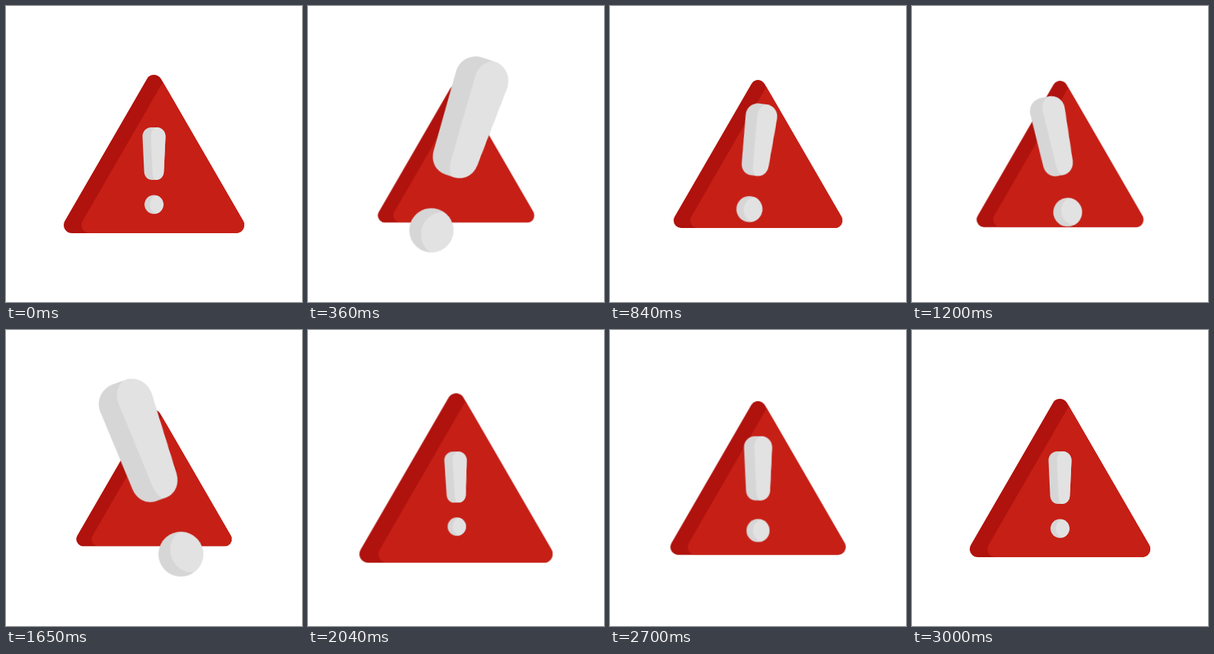
These frames come from a looping animation (400 by 400 pixels, 5.03 s). An HTML page:

```html
<!DOCTYPE html>
<html lang="en">
<head>
<meta charset="utf-8">
<title>Warning sign</title>
<style>
  html, body { margin: 0; width: 100%; height: 100%; overflow: hidden; background: #fff; }
  svg { display: block; width: 100%; height: 100%; }

  .sign, .mark, .tilt {
    animation: 5030ms cubic-bezier(.5, 0, .5, 1) infinite;
  }
  .sign { transform-origin: 200px 200px; animation-name: sign; }
  .mark { transform-origin: 200px 222.5px; animation-name: mark; }
  .tilt { transform-origin: 200px 222.5px; animation-name: tilt; }

  @keyframes sign {
    0%, 59.64%, 100% { transform: scale(1); }
    8.35%  { transform: scale(.862); }
    19.38% { transform: scale(.943); }
    32.21% { transform: scale(.86); }
    44.73% { transform: scale(1.123); }
    50.7%  { transform: scale(.963); }
  }
  @keyframes mark {
    0%, 59.64%, 100% { transform: translate(0, 0) scale(1); }
    8.35%  { transform: translate(.5px, -21.4px) scale(2.375); }
    19.38% { transform: translate(-4px, -9.2px) scale(1.265); }
    32.21% { transform: translate(-.7px, -21.6px) scale(2.375); }
    44.73% { transform: translate(.5px, 3.8px) scale(.62); }
    50.7%  { transform: translate(0, -9.4px) scale(1.28); }
  }
  @keyframes tilt {
    0%, 50.7%, 100% { transform: rotate(0deg); }
    8.35%  { transform: rotate(19deg); animation-timing-function: cubic-bezier(.37, 0, .63, 1); }
    31.01%, 32.21% { transform: rotate(-20deg); }
    44.73% { transform: rotate(3.6deg); }
  }
</style>
</head>
<body>
<svg viewBox="0 0 400 400">
  <defs>
    <path id="triangle" d="M200 104 311 296H89Z" stroke-width="22" stroke-linejoin="round"/>
    <clipPath id="outline">
      <path d="M190.5 98.5A11 11 0 0 1 209.5 98.5L320.5 290.5A11 11 0 0 1 311 307H89A11 11 0 0 1 79.5 290.5Z"/>
    </clipPath>
    <path id="bar" d="M196.5 164H203.5C210.6 164 216 169.8 215.5 177L213.3 224C213 230.5 208.5 235 202.5 235H197.5C191.5 235 187 230.5 186.7 224L184.5 177C184 169.8 189.4 164 196.5 164Z"/>
    <clipPath id="barClip"><use href="#bar"/></clipPath>
  </defs>

  <g class="sign">
    <use href="#triangle" fill="#b0120d" stroke="#b0120d"/>
    <g clip-path="url(#outline)">
      <use href="#triangle" x="24" fill="#c61f16" stroke="#c61f16"/>
    </g>
  </g>

  <g class="mark">
    <g class="tilt">
      <use href="#bar" fill="#d6d6d6"/>
      <path clip-path="url(#barClip)" fill="#e2e2e2" d="M204 163.5C199 165 195.6 170 195.9 176L198 226C198.2 230 199.5 233.5 202 235.5H220V163.5Z"/>
      <circle cx="200" cy="268.3" r="12.8" fill="#d6d6d6"/>
      <path fill="#e2e2e2" d="M203.4 256A12.8 12.8 0 0 1 203.4 280.6C198 279 194.4 274 194.4 268.3S198 257.6 203.4 256Z"/>
    </g>
  </g>
</svg>
</body>
</html>
```
